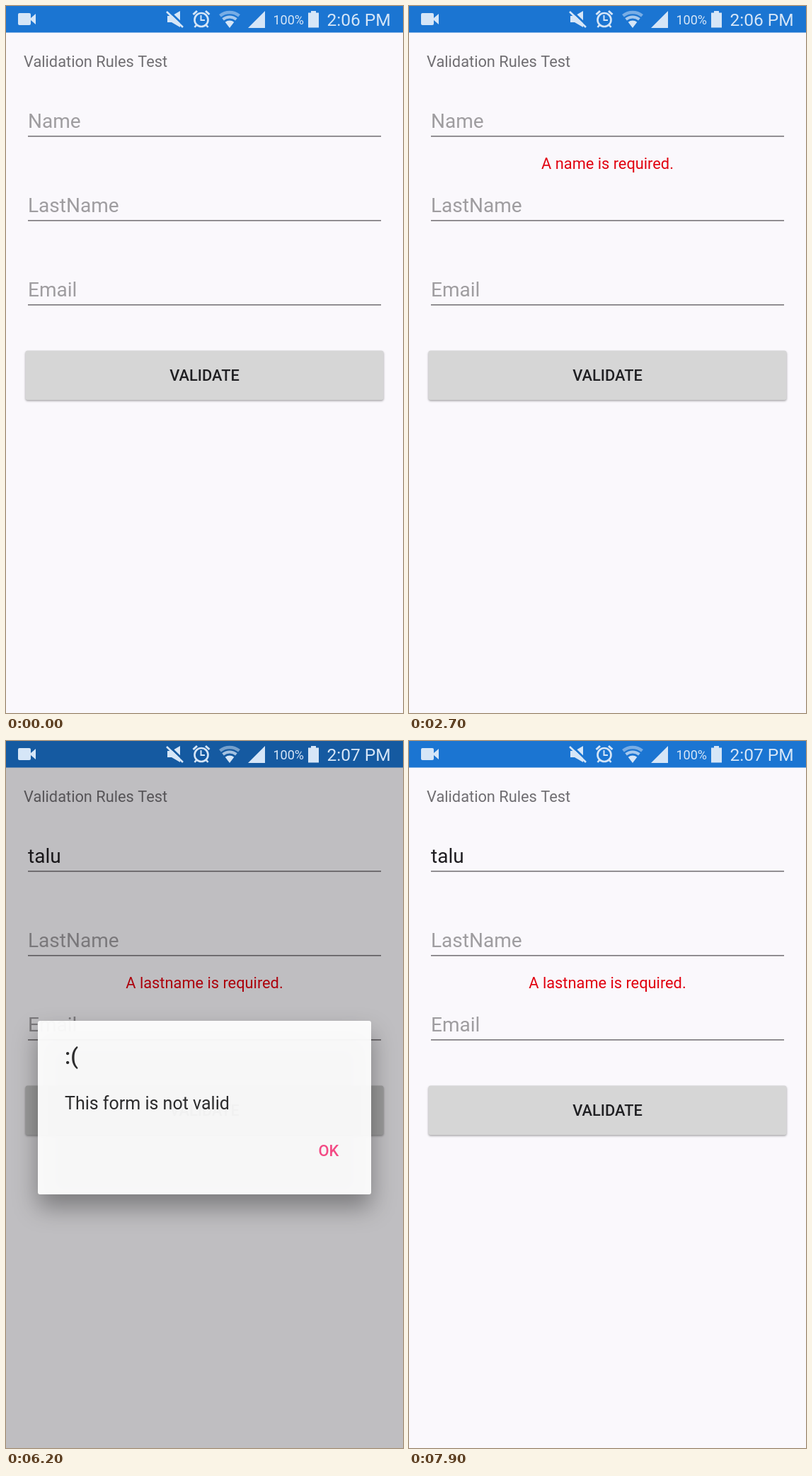
Recreate the animation shown at these times as an HTML page with a canvas. Size 561 by 998 pixels, loop 8000 ms.

```html
<!DOCTYPE html>
<html lang="en">
<head>
<meta charset="utf-8">
<title>Form validation</title>
<style>
html, body { margin: 0; width: 100%; height: 100%; overflow: hidden; background: #faf8fc; }
canvas { display: block; width: 100%; height: 100%; }
</style>
</head>
<body>
<canvas id="stage" width="561" height="998"></canvas>
<script>
const W = 561, H = 998, LOOP = 8000, STEP = 100;
const ctx = document.getElementById('stage').getContext('2d');
const NAME = 'talu';
const TYPED_AT = [3900, 4000, 4200, 4300];
const DIALOGS = [{ open: 800, close: 2200 }, { open: 6100, close: 7500 }];
const OPEN_DIM = [0, .235, .45, .6], OPEN_ALPHA = [0, .94, 1, 1];
const CLOSE_DIM = [.6, .5, .305, .1, 0], CLOSE_ALPHA = [1, .5, .03, 0, 0];
const PINK = '#f73f80', ICON = '#d6e6f7', DARK = '#38383a';

const clamp = (v, a = 0, b = 1) => Math.min(b, Math.max(a, v));
const progress = (t, a, b) => clamp((t - a) / (b - a));
const within = (t, a, b) => t >= a && t < b;
const at = (list, i) => list[clamp(Math.round(i), 0, list.length - 1)];

function text(str, x, y, size, color, { weight = 400, align = 'left' } = {}) {
  ctx.font = `${weight} ${size}px Roboto, sans-serif`;
  ctx.textAlign = align;
  ctx.fillStyle = color;
  ctx.fillText(str, x, y);
}

function rect(x, y, w, h, color) {
  ctx.fillStyle = color;
  ctx.fillRect(x, y, w, h);
}

function box(x, y, w, h, r, color) {
  ctx.beginPath();
  ctx.roundRect(x, y, w, h, r);
  ctx.fillStyle = color;
  ctx.fill();
}

function poly(points, color) {
  ctx.beginPath();
  points.forEach(([x, y]) => ctx.lineTo(x, y));
  ctx.closePath();
  ctx.fillStyle = color;
  ctx.fill();
}

function line(points, width, color) {
  ctx.beginPath();
  points.forEach(([x, y]) => ctx.lineTo(x, y));
  ctx.lineWidth = width;
  ctx.strokeStyle = color;
  ctx.stroke();
}

function arc(x, y, r, a, b, width, color) {
  ctx.beginPath();
  ctx.arc(x, y, r, a, b);
  ctx.lineWidth = width;
  ctx.strokeStyle = color;
  ctx.stroke();
}

function dot(x, y, r, color) {
  ctx.beginPath();
  ctx.arc(x, y, r, 0, 7);
  ctx.fillStyle = color;
  ctx.fill();
}

function withShadow(color, blur, dy, draw) {
  ctx.save();
  ctx.shadowColor = color;
  ctx.shadowBlur = blur;
  ctx.shadowOffsetY = dy;
  draw();
  ctx.restore();
}

// Status bar
function statusIcons(t, barColor) {
  box(17, 10, 18, 17, 2, ICON);
  poly([[35, 17], [42, 11], [42, 26], [35, 20]], ICON);

  poly([[228, 14], [234, 14], [246, 7], [246, 30], [234, 23], [228, 23]], ICON);
  line([[229, 6], [252, 28]], 3, barColor);
  line([[227, 8], [250, 30]], 2.6, ICON);

  arc(276, 19.5, 9.5, 0, 7, 2.6, ICON);
  line([[275.5, 13], [275.5, 20], [281, 20]], 2, ICON);
  line([[264.5, 12], [270, 7]], 3, ICON);
  line([[287.5, 12], [282, 7]], 3, ICON);
  line([[269, 27], [266.5, 30]], 2.6, ICON);
  line([[283, 27], [285.5, 30]], 2.6, ICON);

  const a = -Math.PI / 2 - .68, b = -Math.PI / 2 + .68;
  ctx.globalAlpha = .5;
  arc(316, 30.5, 21.5, a, b, 4.5, ICON);
  ctx.globalAlpha = .75;
  arc(316, 30.5, 15, a, b, 4, ICON);
  ctx.globalAlpha = 1;
  ctx.beginPath();
  ctx.moveTo(316, 31);
  ctx.arc(316, 30.5, 10, a, b);
  ctx.fillStyle = ICON;
  ctx.fill();

  poly([[342, 31], [366, 7], [366, 31]], ICON);
  text('100%', 377.5, 25.5, 18, ICON);
  rect(427, 9.5, 15, 21, ICON);
  rect(431, 7, 7, 3, ICON);
  text(t < 3900 ? '2:06 PM' : '2:07 PM', 453.5, 27.5, 24.5, ICON);
}

// Form
function field(hint, y, value, focused, composing) {
  text(value || hint, 31, y, 28, value ? '#1f1d21' : '#9f9da0');
  if (focused) rect(31, y + 11, 499, 3, PINK);
  else rect(31, y + 11, 499, 1.7, '#807d81');
  if (value && composing) rect(31, y + 3, ctx.measureText(value).width, 1.6, '#1f1d21');
}

function form(t) {
  const typed = NAME.slice(0, TYPED_AT.filter(a => t >= a).length);
  const focused = within(t, 3100, 5200);
  rect(0, 0, W, H, '#faf8fc');
  text('Validation Rules Test', 25, 86, 21.8, '#706e72');
  field('Name', 172, typed, focused, t < 5200);
  const cursorOn = within(t, 3100, 3600) || within(t, 3900, 4500) || within(t, 5000, 5200);
  if (cursorOn) {
    ctx.font = '400 28px Roboto, sans-serif';
    rect(31 + ctx.measureText(typed).width, 145, 2.5, 33, PINK);
  }
  field('LastName', 291);
  field('Email', 410);

  const error = (str, y) => text(str, 280.5, y, 21.8, '#e1000f', { align: 'center' });
  if (within(t, 800, 6100)) error('A name is required.', 230);
  if (t >= 6100) error('A lastname is required.', 349);

  withShadow('rgba(0,0,0,.35)', 3, 1.5, () => box(27.5, 486.5, 506, 69.5, 3, '#d6d6d6'));
  if (within(t, 600, 900) || within(t, 5700, 6300)) {
    box(27.5, 486.5, 506, 69.5, 3, 'rgba(0,0,0,.06)');
  }
  text('VALIDATE', 280.5, 529, 21.8, '#1f1f22', { weight: 500, align: 'center' });
}

// Keyboard
const PITCH = 55.65, KEY_W = 42;
const ROWS = [
  { keys: 'qwertyuiop', marks: '+_=%\\|<>[]', x: 9.5, y: 682 },
  { keys: 'asdfghjkl', marks: '@$!#/&*()', x: 37, y: 762 },
  { keys: 'zxcvbnm', marks: '-;:\'",?', x: 92.5, y: 842 }
];

function key(x, y, w, h, soft) {
  box(x, y + 2, w, h, 3, '#909196');
  box(x, y, w, h, 3, soft ? '#cfd0d3' : '#f8f8fa');
}

function keyboard(typed) {
  rect(0, 538, W, 65, '#6f6f70');
  rect(0, 603, W, 395, '#b9babe');
  if (typed) text(typed[0].toUpperCase() + typed.slice(1), 22, 582, 28.8, '#22e3ee');
  line([[523, 561], [533, 571], [523, 581]], 3.2, '#f2f2f2');

  [...'1234567890'].forEach((c, i) => {
    const x = 9.5 + PITCH * i;
    key(x, 614, KEY_W, 37, true);
    text(c, x + KEY_W / 2, 644, 32, DARK, { weight: 500, align: 'center' });
  });
  for (const row of ROWS) {
    [...row.keys].forEach((c, i) => {
      const x = row.x + PITCH * i;
      key(x, row.y, KEY_W, 49);
      text(c, x + KEY_W / 2, row.y + 41, 35, DARK, { weight: 500, align: 'center' });
      text(row.marks[i], x + KEY_W - 4, row.y + 13, 15, '#acacb0', { align: 'right' });
    });
  }

  key(9.5, 842, 69, 49, true);
  poly([[44, 853], [57, 867], [49, 867], [49, 881], [39, 881], [39, 867], [31, 867]], '#58585a');
  key(481.5, 842, 70, 49, true);
  poly([[498, 867], [508, 857], [534, 857], [534, 877], [508, 877]], '#58585a');
  line([[515, 862.5], [524, 871.5]], 2.5, '#e6e6e8');
  line([[524, 862.5], [515, 871.5]], 2.5, '#e6e6e8');

  key(9.5, 922, 69, 49, true);
  text('Sym', 44, 956, 27, '#58585a', { weight: 500, align: 'center' });

  key(92.5, 922, KEY_W, 49, true);
  box(108.5, 938, 9, 18, 4.5, '#58585a');
  arc(113, 951, 9.5, 0, Math.PI, 2.6, '#58585a');
  line([[113, 960], [113, 967]], 2.6, '#58585a');
  dot(112, 927, 1.8, '#77777a');
  dot(118, 927, 1.8, '#77777a');
  arc(127, 931, 3.3, 0, 7, 2.2, '#77777a');
  for (let i = 0; i < 8; i++) {
    const a = i * Math.PI / 4;
    dot(127 + 5 * Math.cos(a), 931 + 5 * Math.sin(a), 1.1, '#77777a');
  }

  key(148, 922, KEY_W, 49);
  text(',', 169, 962, 35, DARK, { weight: 500, align: 'center' });
  key(204, 922, 208, 49);
  text('English(US)', 307.5, 943.5, 18, DARK, { align: 'center' });
  poly([[239, 937.5], [248, 931], [248, 944]], '#48484a');
  poly([[377, 937.5], [368, 931], [368, 944]], '#48484a');
  line([[287, 956], [287, 965], [328, 965], [328, 956]], 3.5, '#58585a');
  key(426, 922, KEY_W, 49);
  text('.', 447, 961, 35, DARK, { weight: 500, align: 'center' });
  [445.5, 452.5, 459.5].forEach(x => dot(x, 927, 2, '#77777a'));
  key(481.5, 922, 70, 49, true);
  text('Acep.', 516.5, 955, 23, '#58585a', { weight: 500, align: 'center' });
}

function slidingKeyboard(t) {
  if (!within(t, 3200, 5300)) return;
  const rise = 1 - (1 - progress(t, 3100, 3500)) ** 2;
  const drop = progress(t, 4900, 5300) ** 2;
  ctx.save();
  ctx.translate(0, 460 * (1 - rise + drop));
  keyboard(NAME.slice(0, TYPED_AT.filter(a => t >= a).length));
  ctx.restore();
}

// Alert
function dialogState(t) {
  const d = DIALOGS.find(({ open, close }) => within(t, open, close + 400));
  if (!d) return { dim: 0, alpha: 0 };
  const closing = t >= d.close;
  const i = (t - (closing ? d.close : d.open)) / STEP;
  return {
    dim: at(closing ? CLOSE_DIM : OPEN_DIM, i),
    alpha: at(closing ? CLOSE_ALPHA : OPEN_ALPHA, i),
    pressed: t >= d.close - 100
  };
}

function dialog(alpha, pressed) {
  if (!alpha) return;
  ctx.save();
  ctx.globalAlpha = alpha;
  withShadow('rgba(0,0,0,.38)', 34, 18, () => box(45, 395, 471, 245, 3, '#fff'));
  if (pressed) box(415, 550, 84, 56, 3, 'rgba(0,0,0,.1)');
  text(':(', 83, 456, 31, '#1f1f20', { weight: 500 });
  text('This form is not valid', 83, 519.5, 25, '#1f1f20');
  text('OK', 441.5, 586, 21.8, '#f23f7c', { weight: 500 });
  ctx.restore();
}

function draw(t) {
  const { dim, alpha, pressed } = dialogState(t);
  form(t);
  rect(0, 0, W, 37.5, '#1b75d2');
  rect(0, 0, W, H, `rgba(0,0,0,${dim})`);
  slidingKeyboard(t);
  dialog(alpha, pressed);
  const k = 1 - dim;
  statusIcons(t, `rgb(${27 * k},${117 * k},${210 * k})`);
}

const start = performance.now();
function tick() {
  const t = (performance.now() - start) % LOOP;
  draw(Math.floor(t / STEP) * STEP);
  requestAnimationFrame(tick);
}
tick();
</script>
</body>
</html>
```
